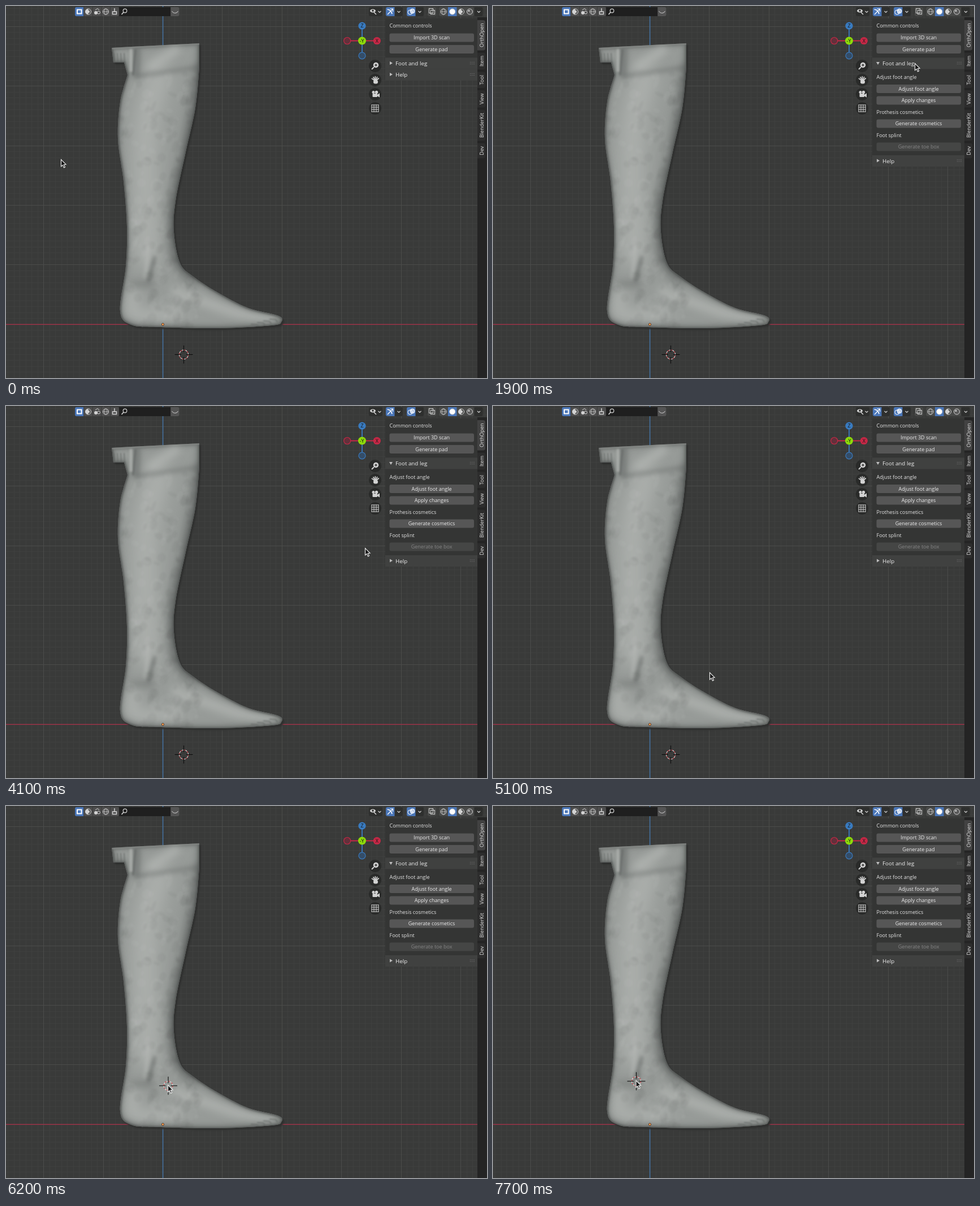
Animation of 851 by 658 pixels, one loop 8000 ms. Source, as an HTML page with a canvas:

```html
<!DOCTYPE html>
<html lang="en">
<head>
<meta charset="utf-8">
<title>Foot angle</title>
<style>
  html, body { margin: 0; width: 851px; height: 658px; overflow: hidden; background: #393a39; }
  canvas { display: block; }
</style>
</head>
<body>
<canvas id="stage" width="851" height="658"></canvas>
<script>
const W = 851, H = 658, LOOP = 8000, TICK = 100, TAU = Math.PI * 2;
const BLUE = '#4a76b8', ICON = '#d2d2d2';
const screen = document.getElementById('stage').getContext('2d');
const backdrop = document.createElement('canvas');
backdrop.width = W;
backdrop.height = H;
let c = backdrop.getContext('2d');

// ---------- helpers ----------
function box(x, y, w, h, fill, r = 0) {
  c.fillStyle = fill;
  c.beginPath();
  c.roundRect(x, y, w, h, r);
  c.fill();
}
function disc(x, y, r, fill, stroke, width = 1) {
  c.beginPath();
  c.arc(x, y, r, 0, TAU);
  if (fill) { c.fillStyle = fill; c.fill(); }
  if (stroke) { c.strokeStyle = stroke; c.lineWidth = width; c.stroke(); }
}
function line(color, width, ...p) {
  c.strokeStyle = color;
  c.lineWidth = width;
  c.beginPath();
  for (let i = 0; i < p.length; i += 2) c.lineTo(p[i], p[i + 1]);
  c.stroke();
}
function label(text, x, y, { size = 9, color = '#e4e4e4', align = 'left' } = {}) {
  c.font = `${size}px "Open Sans", "Noto Sans", sans-serif`;
  c.fillStyle = color;
  c.textAlign = align;
  c.fillText(text, x, y + size * 0.36);
}
function random(seed) {
  return () => (seed = seed * 16807 % 2147483647) / 2147483647;
}
// Catmull-Rom spline through flat x,y points
function spline(path, p) {
  const last = p.length / 2 - 1;
  const at = (i, k) => p[2 * Math.max(0, Math.min(last, i)) + k];
  path.lineTo(p[0], p[1]);
  for (let i = 0; i < last; i++) {
    const a = k => at(i, k) + (at(i + 1, k) - at(i - 1, k)) / 6;
    const b = k => at(i + 1, k) - (at(i + 2, k) - at(i, k)) / 6;
    path.bezierCurveTo(a(0), a(1), b(0), b(1), at(i + 1, 0), at(i + 1, 1));
  }
}

// ---------- viewport ----------
function drawGrid() {
  box(0, 0, W, H, '#393a39');
  const step = 10.54, ox = 277.5, oy = 563.3;
  for (const major of [false, true]) {
    const color = major ? '#4b4c4a' : '#3f403f';
    for (let i = -60; i < 60; i++) {
      if ((i % 10 === 0) !== major) continue;
      const x = Math.floor(ox + i * step) + 0.5, y = Math.floor(oy + i * step) + 0.5;
      line(color, 1, x, 0, x, H);
      line(color, 1, 0, y, W, y);
    }
  }
  line('#9c3349', 1.5, 0, 563.2, 834, 563.2);
  line('#44719f', 1.6, 277.6, 0, 277.6, H);
}

function legOutline() {
  const leg = new Path2D();
  leg.moveTo(187, 74);
  leg.lineTo(222, 72);
  leg.lineTo(342, 66);
  spline(leg, [342, 108, 335, 180, 318, 258, 300, 345, 297, 400, 308, 455, 332, 479, 375, 507, 428, 534,
    482, 548, 487, 559, 470, 565, 375, 570, 270, 568, 222, 564, 202, 540, 212, 460, 214, 390, 208, 310,
    198, 235, 202, 170, 215, 122]);
  leg.lineTo(209, 100);
  leg.lineTo(190, 100);
  leg.closePath();
  return leg;
}

function drawLeg() {
  const leg = legOutline();
  const soft = (color, width, blur, ...points) => {
    const path = new Path2D();
    spline(path, points);
    c.filter = `blur(${blur}px)`;
    c.strokeStyle = color;
    c.lineWidth = width;
    c.stroke(path);
  };
  const light = 'rgba(182,186,183,.62)', dark = 'rgba(92,96,94,.55)';

  c.save();
  c.lineCap = c.lineJoin = 'round';
  c.save();
  c.filter = 'blur(0.8px)';
  c.fillStyle = '#2f302f';
  c.translate(3, 3.5);
  c.fill(leg);
  c.restore();
  c.fillStyle = '#979b98';
  c.fill(leg);
  c.clip(leg);

  // long light down the shin, shade along the front, light on heel and instep
  soft(light, 46, 14, 270, 125, 250, 200, 246, 300, 250, 440);
  soft(dark, 22, 8, 345, 110, 318, 260, 298, 350, 300, 440, 330, 482);
  soft(light, 26, 10, 225, 510, 228, 545, 300, 545);
  soft(light, 18, 7, 300, 505, 400, 540, 470, 552);

  // seeded facets of the scanned mesh
  const rnd = random(7);
  c.filter = 'blur(1.5px)';
  for (let i = 0; i < 260; i++) {
    const x = 195 + rnd() * 150, y = 120 + rnd() * 450;
    c.fillStyle = rnd() < 0.5 ? 'rgba(255,255,255,.035)' : 'rgba(0,0,0,.03)';
    c.beginPath();
    c.ellipse(x, y, 3 + rnd() * 6, 3 + rnd() * 9, 0.4, 0, TAU);
    c.fill();
  }

  // rim shade, heavier toward front and sole
  for (let i = 1; i <= 3; i++) {
    c.save();
    c.translate(1 - i * 0.8, 1 - i * 0.8);
    c.filter = `blur(${i * 1.7}px)`;
    c.strokeStyle = `rgba(70,73,71,${0.75 / i})`;
    c.lineWidth = i * 3;
    c.stroke(leg);
    c.restore();
  }

  // ankle bone
  soft(light, 6, 3, 252, 425, 247, 480);
  soft(dark, 6, 3, 263, 445, 252, 486);
  soft(dark, 8, 7, 222, 492, 260, 492);

  // collar and fold
  soft(dark, 12, 5, 232, 78, 230, 122);
  soft(light, 18, 7, 300, 78, 258, 106);
  soft(dark, 5, 4, 232, 124, 342, 108);
  soft(dark, 4, 1.5, 229, 78, 225, 121);
  soft(light, 5, 1.5, 221, 78, 221, 114);
  soft(light, 2, 0.8, 188, 75, 222, 73, 342, 67);
  for (let x = 191; x < 214; x += 6) soft(dark, 2, 1, x, 84, x + 1, 101);

  // toes
  for (let i = 0; i < 4; i++) {
    const x = 434 + i * 11, y = 563 - i * 3;
    soft(dark, 2, 0.9, x, y, x + 10, y + 1, x + 13, y + 5);
  }
  c.restore();
  disc(277.5, 563.2, 2.1, '#f39a52', '#3b2a1c', 0.8);
}

// ---------- header, gizmo and tabs ----------
function chevron(x) {
  line(ICON, 1.2, x - 2.5, 9, x, 11.5, x + 2.5, 9);
}
function ball(x, fill) {
  disc(x, 10, 5, fill, ICON);
}
function halfBall(x) {
  ball(x);
  c.fillStyle = ICON;
  c.beginPath();
  c.arc(x, 10, 5, Math.PI / 2, Math.PI * 1.5);
  c.arc(x, 10, 2.5, -Math.PI / 2, Math.PI / 2);
  c.fill();
}
function globe(x) {
  ball(x);
  c.beginPath();
  c.ellipse(x, 10, 2.2, 5, 0, 0, TAU);
  c.lineWidth = 0.7;
  c.stroke();
  line(ICON, 0.7, x - 5, 10, x + 5, 10);
}

function drawHeader() {
  box(122, 2, 78, 16, '#4d4d4d', 3);
  box(122, 2, 15.5, 16, BLUE, [3, 0, 0, 3]);
  for (let i = 1; i < 5; i++) line('#363636', 0.8, 122 + i * 15.6, 2, 122 + i * 15.6, 18);
  c.strokeStyle = '#fff';
  c.lineWidth = 2;
  c.strokeRect(126, 6.5, 7.5, 7);
  halfBall(145.5);
  disc(159, 12, 3, ICON);
  disc(164, 11.5, 2.5, null, ICON);
  line(ICON, 1, 158, 7, 162, 4.5, 165, 7);
  globe(176.5);
  line(ICON, 1.5, 192, 4, 192, 10);
  c.strokeStyle = ICON;
  c.strokeRect(188.5, 10, 7, 4.5);
  box(200, 2, 91, 16, '#1f1f1f');
  disc(210.5, 8.5, 3.3, null, ICON, 1.2);
  line(ICON, 1.6, 208, 11, 204.5, 15);
  box(291.5, 2, 15, 16, '#545454', [0, 3, 3, 0]);
  c.strokeStyle = ICON;
  c.lineWidth = 1;
  c.beginPath();
  c.arc(299, 6.5, 6, 0.45, Math.PI - 0.45);
  c.stroke();

  box(642, 2, 24, 16, '#2e2f2e', 3);
  c.fillStyle = ICON;
  c.beginPath();
  c.ellipse(649, 8.5, 5, 3, 0, 0, TAU);
  c.fill();
  disc(649, 8.3, 1.7, '#2e2f2e');
  line(ICON, 1.6, 651, 11, 655, 15);
  for (const x of [672, 709]) {
    box(x, 2, 30, 16, '#2e2f2e', 3);
    box(x, 2, 15.5, 16, BLUE, [3, 0, 0, 3]);
  }
  c.strokeStyle = '#fff';
  c.beginPath();
  c.arc(674, 15, 9, -1.5, -0.1);
  c.stroke();
  line('#fff', 1.2, 675, 15, 684, 5.5);
  line('#fff', 1.2, 679.5, 5, 684.5, 5, 684.5, 10);
  disc(715, 11, 4, null, '#fff');
  disc(719, 9, 4, 'rgba(255,255,255,.65)', '#fff');
  box(746, 2, 15, 16, '#484948', 3);
  box(766, 2, 62, 16, '#484948', 3);
  box(828.5, 2, 15, 16, '#2e2f2e', 3);
  for (const x of [661, 695, 732, 836.5]) chevron(x);
  c.lineWidth = 1;
  c.strokeStyle = ICON;
  c.strokeRect(748.5, 4.5, 7, 8);
  c.strokeRect(751.5, 7.5, 7, 7);
  globe(774);
  box(782, 2, 15.5, 16, BLUE);
  ball(789.7, '#fff');
  halfBall(805.5);
  ball(820.5, '#5a5a5a');
  disc(819, 8.5, 1.5, ICON);
}

function drawGizmo() {
  const x = 630, y = 61.5, arm = 26.3;
  const axis = (name, dx, dy, bright, dim) => {
    line(bright, 1.8, x - dx, y - dy, x + dx, y + dy);
    disc(x - dx, y - dy, 6, dim, bright, 1.2);
    disc(x + dx, y + dy, 6.6, bright);
    label(name, x + dx, y + dy, { color: '#181818', align: 'center' });
  };
  axis('X', arm, 0, '#c62846', '#63303b');
  axis('Z', 0, -arm, '#397bc0', '#344d68');
  disc(x, y, 7, '#8edb0a');
  label('-Y', x - 0.5, y, { color: '#181818', align: 'center' });

  const rows = [0, 1, 2, 3].map(i => 106 + i * 25);
  for (const row of rows) disc(653, row, 11, '#292a29');
  const [zoom, hand, camera, mesh] = rows;
  disc(654.5, zoom - 1.5, 4.7, ICON);
  line(ICON, 2, 651, zoom + 2, 647, zoom + 6);
  line('#292a29', 1.2, 652, zoom - 1.5, 657, zoom - 1.5);
  line('#292a29', 1.2, 654.5, zoom - 4, 654.5, zoom + 1);
  c.lineCap = 'round';
  for (let i = 0; i < 5; i++) {
    const a = -2.6 + i * 0.5;
    line(ICON, 1.8, 653.5, hand + 2, 653.5 + 7 * Math.cos(a), hand + 1 + 7 * Math.sin(a));
  }
  c.lineCap = 'butt';
  box(650, hand, 8, 6.5, ICON, 3);
  disc(650, camera - 3.5, 2.5, ICON);
  disc(655.5, camera - 3.5, 2.7, ICON);
  box(648.5, camera - 1, 8.5, 6, ICON, 1);
  line(ICON, 2, 657, camera + 2, 660, camera, 660, camera + 4, 657, camera + 2);
  for (let d = -6; d <= 6; d += 4) {
    line(ICON, 1, 653 + d, mesh - 6.5, 653 + d, mesh + 6.5);
    line(ICON, 1, 646.5, mesh + d, 659.5, mesh + d);
  }
}

function drawTabs() {
  box(834, 20, 17, 638, '#242424');
  let top = 25;
  for (const name of ['OrthOpen', 'Item', 'Tool', 'View', 'BlenderKit', 'Dev']) {
    const active = top === 25;
    c.font = '9px "Open Sans", "Noto Sans", sans-serif';
    const h = c.measureText(name).width + 11;
    box(834, top, 14, h, active ? '#424242' : '#2d2d2d', [0, 4, 4, 0]);
    c.save();
    c.translate(841.5, top + h / 2);
    c.rotate(-Math.PI / 2);
    label(name, 0, 0, { align: 'center' });
    c.restore();
    top += h + 4;
  }
}

// ---------- side panel ----------
const ROW = 20.5;
function button(text, y, fill = '#565656', color = '#ececec') {
  box(678.5, y - 7.5, 149.5, 15, fill, 3);
  label(text, 753, y, { color, align: 'center' });
}
function panelHead(text, y, open) {
  box(671, y - 10, 163, 20, '#404140');
  c.save();
  c.translate(681, y - 0.5);
  if (open) c.rotate(Math.PI / 2);
  c.fillStyle = '#bdbdbd';
  c.beginPath();
  for (const [px, py] of [[-2, -3], [3, 0], [-2, 3]]) c.lineTo(px, py);
  c.fill();
  c.restore();
  label(text, 689, y, { size: 9.8, color: '#ededed' });
  for (let i = 0; i < 8; i++) box(821 + (i % 4) * 2.3, y - 2.5 + (i >> 2) * 3, 1, 1, '#747474');
}
function drawPanel(open, adjustFill) {
  box(671, 22, 163, 69.5, '#343534');
  label('Common controls', 678.5, 35);
  button('Import 3D scan', 56);
  button('Generate pad', 56 + ROW);
  const helpY = 121.5 + 152.5 * open;
  c.save();
  c.beginPath();
  c.rect(671, 111, 163, helpY - 121);
  c.clip();
  box(671, 111, 163, 160, '#343534');
  const row = i => 126 + i * ROW;
  label('Adjust foot angle', 678.5, row(0));
  button('Adjust foot angle', row(1), adjustFill);
  button('Apply changes', row(2));
  label('Prothesis cosmetics', 678.5, row(3));
  button('Generate cosmetics', row(4));
  label('Foot splint', 678.5, row(5));
  button('Generate toe box', row(6), '#454645', '#858585');
  c.restore();
  panelHead('Foot and leg', 101.5, open > 0);
  panelHead('Help', helpY, false);
}

// ---------- pointers ----------
function drawCrosshair(x, y) {
  const parts = 16;
  for (let i = 0; i < parts; i++) {
    c.beginPath();
    c.arc(x, y, 8, i * TAU / parts, (i + 1) * TAU / parts);
    c.strokeStyle = i % 2 ? '#e8e4e4' : '#d9464e';
    c.lineWidth = 1.1;
    c.stroke();
  }
  for (const s of [-1, 1]) {
    line('#0c0c0c', 1.1, x + s * 4.5, y, x + s * 16, y);
    line('#0c0c0c', 1.1, x, y + s * 4.5, x, y + s * 16);
  }
}
function drawMouse(x, y) {
  c.save();
  c.translate(x + 0.5, y + 0.5);
  c.beginPath();
  for (const p of [[0, 0], [0, 12.3], [2.8, 9.8], [5, 14.5], [7, 13.6], [4.9, 9], [8.6, 8.8]]) c.lineTo(...p);
  c.closePath();
  c.fillStyle = '#171717';
  c.fill();
  c.strokeStyle = '#f2f2f2';
  c.lineWidth = 1.1;
  c.stroke();
  c.restore();
}

const START = [97, 271];
const MOVES = [
  { from: 500, to: 1300, x: 761, y: 92, sag: 110 },
  { from: 1300, to: 1400, x: 746, y: 101 },
  { from: 2100, to: 2700, x: 744, y: 146 },
  { from: 4000, to: 4100, x: 635, y: 251 },
  { from: 4100, to: 4300, x: 562, y: 366 },
  { from: 4500, to: 4900, x: 392, y: 467 },
  { from: 5000, to: 5100, x: 383, y: 471 },
  { from: 5100, to: 5600, x: 286, y: 493 },
  { from: 6200, to: 7400, x: 252.5, y: 485 }
];
function mouseAt(t) {
  let [x, y] = START;
  for (const m of MOVES) {
    if (t <= m.from) break;
    const k = Math.min(1, (t - m.from) / (m.to - m.from)), ease = k * k * (3 - 2 * k);
    x += (m.x - x) * ease;
    y += (m.y - y) * ease + (m.sag || 0) * Math.sin(Math.PI * ease);
  }
  return [x, y];
}

function frame(now) {
  const t = Math.floor((now % LOOP) / TICK) * TICK;
  const [mx, my] = mouseAt(t);
  const open = Math.max(0, Math.min(1, (t - 1600) / 300));
  const hover = mx > 678 && mx < 828 && my > 138 && my < 154;
  c.drawImage(backdrop, 0, 0);
  if (t < 5600) drawCrosshair(314.5, 616.5);
  else drawCrosshair(mx + 1, my + 1.8);
  drawPanel(open, t === 3200 ? BLUE : hover ? '#6c6c6c' : undefined);
  drawMouse(mx, my);
  requestAnimationFrame(frame);
}

drawGrid();
drawLeg();
drawHeader();
drawGizmo();
drawTabs();
c = screen;
requestAnimationFrame(frame);
</script>
</body>
</html>
```
